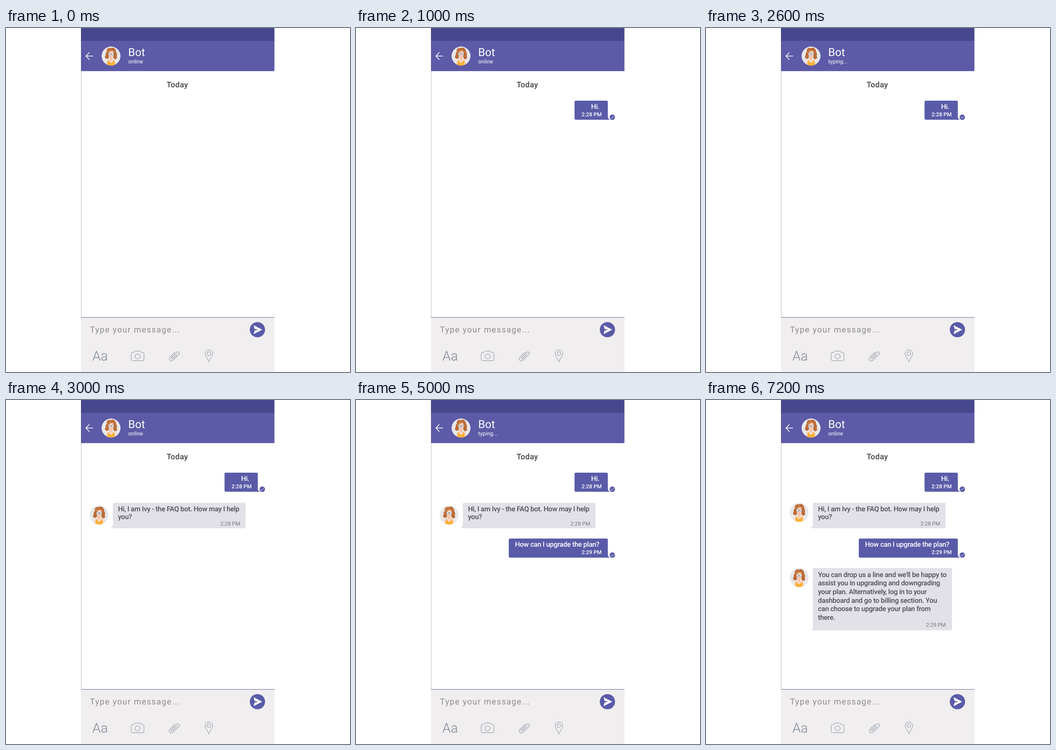
Recreate the animation shown at these times as an HTML page. Size 748 by 748 pixels, loop 8 s.

```html
<!DOCTYPE html>
<html lang="en">
<head>
<meta charset="utf-8">
<title>Chat</title>
<style>
  html, body { margin: 0; width: 100%; height: 100%; overflow: hidden; background: #fff; }
  svg { display: block; width: 100vw; height: 100vh; }
  text { font: 15.1px Roboto, sans-serif; white-space: pre; text-rendering: geometricPrecision; }
  .sent text, .got text { font-weight: 500; letter-spacing: -.29px; }
  .sent text { fill: #fff; text-anchor: end; }
  .got text { fill: #4f4e55; }
  .sent .time, .got .time { font-size: 11.7px; letter-spacing: 0; }
  .got .time { font-weight: 400; fill: #77767d; text-anchor: end; }
  .icon { fill: none; stroke: #8791a0; stroke-linejoin: round; stroke-linecap: round; }
</style>
</head>
<body>
<svg viewBox="0 0 748 748">
  <defs>
    <clipPath id="disc"><circle r="20.7"/></clipPath>
    <g id="avatar" clip-path="url(#disc)">
      <circle r="20.7" fill="#e8e8e9"/>
      <path d="M-1-17C-6-19-11-14-9-9C-13-6-11-3-12-1C-15 3-12 7-7 6L-4 3H5L7 7C12 8 15 4 12 0C15-4 11-7 11-10C10-17 4-20-1-17Z" fill="#bd6c39"/>
      <path d="M-3 3H3V8C6 9 9 9 10 13L11 22H-11L-10 13C-9 9-6 9-3 8Z" fill="#fbd3bb"/>
      <path d="M-3 4H3V6Q0 9-3 7Z" fill="#eeb394"/>
      <path d="M-7 9L-5.5 9Q-4 14 0 15Q4 14 5.5 9L7 9L8.5 22H-8.5Z" fill="#fbb034"/>
      <path d="M-6-6Q-5-11 1-12Q6-11 6-5Q6 1 3 4Q0 6.5-3 4Q-6 1-6-6Z" fill="#fcd9c3"/>
      <path d="M-8-4Q-10-13-2-15Q6-16 8-4Q6-9 3-11Q-4-10-8-4Z" fill="#c97942"/>
      <g fill="#e4e8ea" stroke="#69646a" stroke-width=".7">
        <circle cx="-3.4" cy="-4" r="2.7"/><circle cx="3.4" cy="-4" r="2.7"/>
        <path d="M-.7-4.3H.7" fill="none"/>
      </g>
      <path d="M-2 1.4Q0 3.2 2 1.4Z" fill="#d9493f"/>
    </g>
    <g id="tick">
      <path d="M-10.5-2Q-10 4-4 5.5H-13V-2Z" fill="#5a5ba8"/>
      <circle r="6.8" fill="#fff"/>
      <circle r="5.9" fill="#5a5ba8"/>
      <path d="M-3.6.2L-1.2 2.4L3.8-2.4" fill="none" stroke="#fff" stroke-width=".9"/>
    </g>
  </defs>

  <path d="M163.5 93V629" stroke="#bfbfc3"/>
  <path d="M163 0H583.7V28.3H163Z" fill="#47478e"/>
  <path d="M163 28H583.7V93.7H163Z" fill="#5d5aa7"/>
  <path d="M189.2 61H174.2M181.4 53L173.8 61L181.4 69" fill="none" stroke="#fff" stroke-width="1.6"/>
  <use href="#avatar" x="228.4" y="60.8"/>
  <text x="265.8" y="60.6" fill="#fff" style="font-size:24px">Bot</text>
  <text id="status" x="265.7" y="76.5" fill="#fff" style="font-size:12px"></text>
  <text x="372.5" y="129" fill="#444" text-anchor="middle" style="font-size:17px;font-weight:500;letter-spacing:.3px">Today</text>

  <g id="chat"></g>

  <path d="M163 629H583.7V748H163Z" fill="#f0eeef"/>
  <path d="M163 629.3H583.7" stroke="#66668f" stroke-width="1.1"/>
  <text x="182.5" y="661.6" fill="#8d8b8f" style="font-size:18px;letter-spacing:1.35px">Type your message...</text>
  <circle cx="546.7" cy="656" r="16.6" fill="#5a5ba8"/>
  <path d="M538.3 646.2L557.2 656L538.3 665.8L540.6 657.7L549 656L540.6 654.3Z" fill="#fff"/>
  <text x="187.8" y="723.3" fill="#7d8797" style="font-size:29px;font-weight:300">Aa</text>
  <g class="icon">
    <path d="M275.5 705.3H278.5L280.3 702.4H291.7L293.5 705.3H296.6Q300 705.3 300 708.7V720.2Q300 723.5 296.6 723.5H275.6Q272.2 723.5 272.2 720.2V708.7Q272.2 705.3 275.5 705.3Z"/>
    <circle cx="286.1" cy="714" r="5.6"/>
    <path d="M5.5 1.6H-7.5A1.6 1.6 0 0 1-7.5-1.6H9A3.2 3.2 0 0 1 9 4.8H-9.5A4.7 4.7 0 0 1-9.5-4.6H6" transform="translate(366.3 712.6) rotate(-45)"/>
    <path d="M441.2 725.7C439 719 433 713.5 433 708A8.2 8.2 0 0 1 449.4 708C449.4 713.5 443.4 719 441.2 725.7Z"/>
    <circle cx="441.2" cy="708" r="4"/>
  </g>
</svg>
<script>
const text = (x, y, s, cls = '') => `<text x="${x}" y="${y}" class="${cls}">${s}</text>`;

const box = (x, y, right, bottom, fill) =>
  `<rect x="${x}" y="${y}" width="${right - x}" height="${bottom - y}" rx="3" fill="${fill}"/>`;

const sent = (from, x, y, words, time) => `<g class="sent" data-from="${from}">
  ${box(x, y, 547.6, y + 41.6, '#5a5ba8')}
  <use href="#tick" x="557.3" y="${y + 36}"/>
  ${text(529.2, y + 18, words)}${text(534.2, y + 33.9, time, 'time')}</g>`;

const got = (from, y, right, bottom, first, gap, lines, time, timeX, timeY) => `<g class="got" data-from="${from}">
  <use class="face" href="#avatar" x="202.5" y="${y + 20.8}"/>
  ${box(232.4, y, right, bottom, '#e2e1e8')}
  <path d="M232.4 ${bottom - 6}Q232 ${bottom - 3} 227.5 ${bottom - 2.5}Q229 ${bottom} 236 ${bottom}V${bottom - 6}Z" fill="#e2e1e8"/>
  ${lines.map((s, i) => text(243.4, first + i * gap, s)).join('')}
  ${text(timeX, timeY, time, 'time')}</g>`;

const chat = document.getElementById('chat');
const status = document.getElementById('status');
chat.innerHTML =
  sent(1, 475.2, 158, 'Hi.', '2:28 PM') +
  got(3, 223.4, 520.8, 279, 241.7, 17, ['Hi, I am Ivy - the FAQ bot. How may I help', 'you?'], '2:28 PM', 509.2, 272.7) +
  sent(4, 332.2, 301.2, 'How can I upgrade the plan?', '2:29 PM') +
  got(6, 365.2, 535, 500.8, 384.7, 18.6, [
    "You can drop us a line and we'll be happy to",
    'assist you in upgrading and downgrading',
    'your plan. Alternatively, log in to your',
    'dashboard and go to billing section. You',
    'can choose to upgrade your plan from',
    'there.'
  ], '2:29 PM', 521.5, 493.4);

const groups = [...chat.children];
const firstFace = chat.querySelector('.face');
const start = performance.now();

function draw(now) {
  const step = Math.floor(Math.max(0, now - start) % 8000 / 1000);
  for (const g of groups) g.style.display = step >= g.dataset.from ? '' : 'none';
  // The first bot avatar sits lower until the second reply arrives.
  firstFace.setAttribute('y', step < 6 ? 250 : 244.2);
  status.textContent = step === 2 || step === 5 ? 'typing...' : 'online';
  requestAnimationFrame(draw);
}
draw(start);
</script>
</body>
</html>
```
